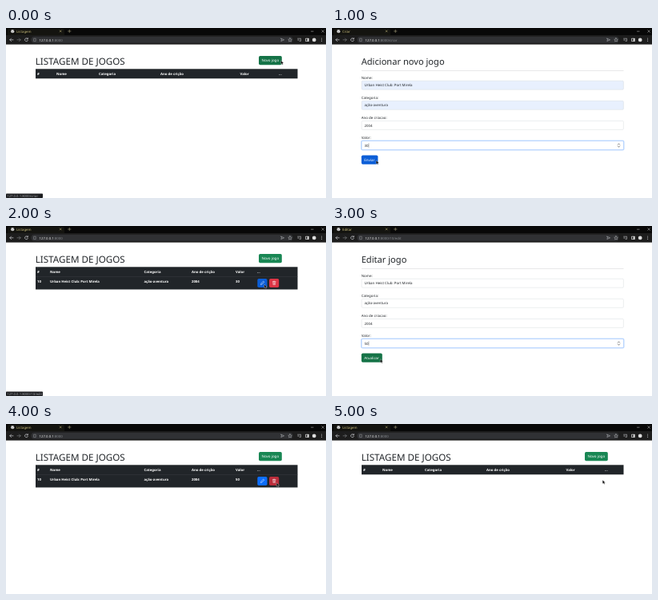
Write an HTML page that moves like this. It is 400 px wide and 213 px high and loops after 6 s.

```html
<!DOCTYPE html>
<html lang="pt-BR">
<head>
<meta charset="utf-8">
<title>Jogos</title>
<style>
  html, body { margin: 0; width: 100%; height: 100%; overflow: hidden; background: #fff; }
  svg { display: block; width: 100%; height: 100%; }
  text { font-family: "Noto Sans", sans-serif; text-rendering: geometricPrecision; white-space: pre; }
</style>
</head>
<body>
<svg id="stage" viewBox="0 0 400 213" preserveAspectRatio="none"></svg>
<script>
const STEP = 1000;
const GAME = "Urban Heist Club: Port Mirela";
const HOST = "127.0.0.1";
const INK = "#212529";

const rect = (x, y, w, h, fill, r = 0, extra = "") =>
  `<rect x="${x}" y="${y}" width="${w}" height="${h}" rx="${r}" fill="${fill}" ${extra}/>`;
const text = (x, y, size, fill, str, weight = 400) =>
  `<text x="${x}" y="${y}" font-size="${size}" fill="${fill}" font-weight="${weight}">${str}</text>`;
const line = (d, color, width = 0.7) =>
  `<path d="${d}" fill="none" stroke="${color}" stroke-width="${width}" stroke-linecap="round" stroke-linejoin="round"/>`;
const circle = (x, y, r, fill) => `<circle cx="${x}" cy="${y}" r="${r}" fill="${fill}"/>`;

function browser(title, path) {
  const icon = "#c9cbce";
  return rect(0, 0, 400, 10, "#080808") +
    rect(2, 1, 71, 9, "#141410", 1.5) +
    rect(0, 9, 400, 11.6, "#1d1d1d") +
    circle(8.2, 4.2, 2.1, "#e4e4e4") +
    line("M6.8 3.6l1.2 .9 .2 1.3M8.8 2.4l.2 1 1 .5", "#555", 0.5) +
    text(13, 5.7, 4.3, "#c9bd7c", title) +
    line("M67.2 3l2 2m0-2l-2 2", "#c9bd7c", 0.5) +
    line("M77.6 4h3.4m-1.7-1.7v3.4", "#bdb68e", 0.5) +
    line("M381.5 4.2h2.6M394.8 2.8l2.6 2.6m0-2.6l-2.6 2.6", "#aaa", 0.6) +
    line("M9 14.8H4.8m1.8-1.8l-1.8 1.8 1.8 1.8", icon) +
    line("M14 14.8h4.2m-1.8-1.8l1.8 1.8-1.8 1.8", "#77797c") +
    line("M27 13.4a2 2 0 1 0 .4 2M27.3 12.5v1.4h-1.4", icon) +
    rect(31.5, 10.8, 327, 8, "#303134", 4) +
    line("M35 13.2h2.2v3.4H35z", "#a0a2a5", 0.5) +
    `<text x="41.5" y="16.5" font-size="4.3" fill="#e4e4e4">${HOST}<tspan fill="#85888c">:8000${path}</tspan></text>` +
    line("M343.8 13.1l3.8 1.7-3.8 1.7 .6-1.7z", icon, 0.5) +
    line("M355 12.6l.7 1.5 1.6.2-1.2 1.1.3 1.6-1.4-.8-1.4.8.3-1.6-1.2-1.1 1.6-.2z", icon, 0.45) +
    line("M364.6 13.2h3.8M364.6 15h2M367 16.4h1.5v-2.6", icon, 0.6) +
    rect(374.3, 12.7, 4.4, 4.4, "#d8d8d8", 0.5) + rect(375, 13.5, 1.6, 2.8, "#222") +
    circle(385.2, 14.9, 2.4, "#dedede") +
    [13, 14.8, 16.6].map(y => circle(394.6, y, 0.5, icon)).join("");
}

const status = path => path ? rect(0, 207.4, 46, 5.6, "#1c1d20", 0.8) +
  text(1.3, 211.9, 4.2, "#a4a6a9", `${HOST}:8000/${path}`) : "";

const pointer = (x, y) =>
  `<path transform="translate(${x} ${y})" d="M0 0v4.5l1.1-.9.8 1.5.9-.5-.8-1.4 1.5-.1z" fill="#080808" stroke="#fff" stroke-width=".3"/>`;

const button = (x, y, w, h, color, label = "", tx = 3.5) =>
  rect(x, y, w, h, color, 1.7) + text(x + tx, y + h / 2 + 1.6, 4.5, "#fff", label);

const cells = (xs, y, size, values) =>
  values.map((v, i) => text(xs[i], y, size, "#fff", v, 700)).join("");

function list({ price, hover }) {
  const xs = price ? [39, 55, 172.5, 232, 287, 314] : [39, 63, 116, 193, 292.5, 341];
  let out = text(36.7, 46, 11.65, INK, "LISTAGEM DE JOGOS") +
    button(316, 35, 28.8, 11.2, hover === "new" ? "#157347" : "#198754", "Novo jogo") +
    rect(37, 51.3, 327.5, price ? 28.2 : 12, INK) +
    cells(xs, 59, 4.3, ["#", "Nome", "Categoria", "Ano de crição", "Valor", "..."]);
  if (price) {
    out += rect(37, 63, 327.5, 0.35, "#43474b") +
      cells(xs, 71, 4.25, ["10", GAME, "ação-aventura", "2004", price]) +
      button(314.3, 66, 12.2, 11, hover === "edit" ? "#0b5ed7" : "#0d6efd") +
      button(329, 66, 12.2, 11, hover === "delete" ? "#bb2d3b" : "#dc3545") +
      line("M318.6 73.3l.4-1.5 2.7-2.7 1.1 1.1-2.7 2.7z", "#fff", 0.5) +
      line("M333.3 69.7h3.8m-2.5 0v-.6h1.2v.6m-2.1.2l.2 3.7h2.6l.2-3.7m-1.9 1v1.8m.8-1.8v1.8", "#fff", 0.45);
  }
  return out;
}

function form({ heading, price, filled, action, color, width }) {
  const fields = [["Nome:", GAME], ["Categoria:", "ação-aventura"], ["Ano de criacao:", "2004"], ["Valor:", price]];
  let out = text(36.7, 46, 11.1, INK, heading) + rect(37, 53.6, 327.5, 0.4, "#c4c6c8");
  fields.forEach(([label, value], i) => {
    const y = 66.2 + i * 25.1, focus = i === 3;
    const fill = filled && i < 2 ? "#e8f0fe" : "#fff";
    if (focus) out += rect(36, y - 1, 329.5, 13, "#c2dbfe", 2.3);
    out += text(36.7, y - 2.2, 4.45, INK, label) +
      rect(37.1, y, 327.3, 11, fill, 1.3, `stroke="${focus ? "#86b7fe" : "#ced4da"}" stroke-width=".4"`) +
      text(40.4, y + 7.1, 4.4, INK, value);
  });
  return out + line("M45.9 144.8v4.6", INK, 0.35) +
    line("M357.4 146.1l1.1-1.3 1.1 1.3M357.4 148l1.1 1.3 1.1-1.3", "#555", 0.7) +
    button(36.8, 159.6, width, 11.2, color, action);
}

const home = ["Listagem", ""];
const created = { heading: "Adicionar novo jogo", price: "30", filled: true, action: "Enviar", color: "#0b5ed7", width: 20.6 };
const edited = { heading: "Editar jogo", price: "50", action: "Atualizar", color: "#157347", width: 26 };

// [tab and path, page, pointer position, status path]
const scenes = [
  [home, list({ hover: "new" }), [343.6, 40.8], "criar"],
  [["Criar", "/criar"], form(created), [55.2, 166], ""],
  [home, list({ price: "30", hover: "edit" }), [322.8, 73.2], "10/edit"],
  [["Editar", "/10/edit"], form(edited), [60.3, 166.8], ""],
  [home, list({ price: "50", hover: "delete" }), [338.2, 73.7], ""],
  [home, list({}), [338.2, 70.3], ""]
];

const stage = document.getElementById("stage");
stage.innerHTML = scenes.map(([tab, page, at, link]) =>
  `<g visibility="hidden">${rect(0, 0, 400, 213, "#fff")}${page}${browser(...tab)}${status(link)}${pointer(...at)}</g>`).join("");

const groups = [...stage.children];
const start = performance.now();
function draw() {
  const elapsed = Math.max(0, performance.now() - start);
  const current = Math.floor(elapsed / STEP) % groups.length;
  groups.forEach((g, i) => g.setAttribute("visibility", i === current ? "visible" : "hidden"));
  requestAnimationFrame(draw);
}
draw();
</script>
</body>
</html>
```
